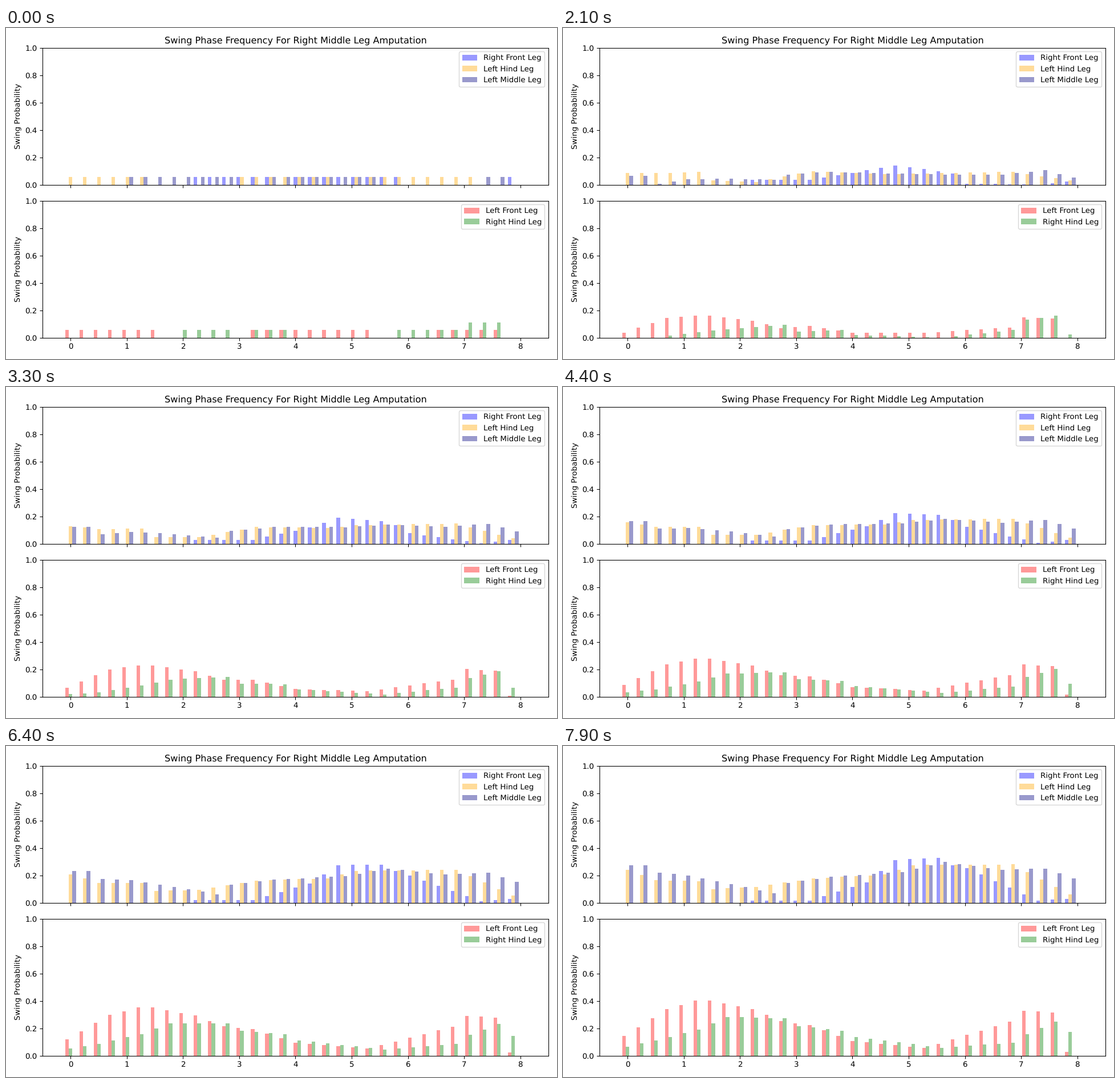
These frames come from a looping animation (966x580 px, 8000 ms). A matplotlib script:

```python
import numpy as np
import matplotlib.pyplot as plt
from matplotlib.animation import FuncAnimation

W, H, DPI = 966, 580, 96.6
FRAMES, STEP_MS = 80, 100
BIN_WIDTH = 0.254
BAR_WIDTH = BIN_WIDTH / 4
BINS = np.arange(32)
FLIES = 18
HOLD_END, MID, END = 200, 2100, 7900

plt.rcParams["text.hinting"] = "none"
fig = plt.figure(figsize=((W + 0.001) / DPI, (H + 0.001) / DPI), dpi=DPI)
legs = []


def add_panel(top, show_labels):
    left, right, height = 63.9, 951, 240
    ax = fig.add_axes([left / W, 1 - (top + height) / H,
                       (right - left) / W, height / H])
    ax.set_xlim(-0.5, 8.5)
    ax.set_ylim(0, 1)
    ax.set_xticks(range(9))
    ax.set_ylabel("Swing Probability")
    ax.tick_params(labelbottom=show_labels)
    return ax


def add_leg(ax, name, color, slot, runs, points):
    """runs: bins of the first swings; points: (bin, middle, final) corners
    of the later profiles, in thousandths."""
    start = sum(((BINS >= a) & (BINS <= b)) / FLIES for a, b in runs)
    corner, mid, final = np.array(points).T
    mid = np.interp(BINS, corner, mid) / 1000
    final = np.interp(BINS, corner, final) / 1000
    x = BINS * BIN_WIDTH + slot * BAR_WIDTH
    bars = ax.bar(x, start, BAR_WIDTH, color=color, alpha=0.4, label=name)
    legs.append((bars, start, mid, final))


upper = add_panel(34.6, False)
lower = add_panel(302.6, True)
upper.set_title("Swing Phase Frequency For Right Middle Leg Amputation")

add_leg(upper, "Right Front Leg", "blue", -1,
        [(9, 14), (16, 23), (31, 31)],
        [(8, 0, 0), (9, 35, 13), (13, 35, 13), (17, 105, 150),
         (19, 140, 312), (22, 100, 328), (23, 80, 273), (24, 8, 252),
         (29, 0, 15), (31, 25, 28)])

add_leg(upper, "Left Hind Leg", "orange", 0,
        [(0, 5), (12, 18), (20, 28)],
        [(0, 84, 240), (2, 84, 163), (5, 95, 157), (6, 30, 100),
         (9, 20, 115), (13, 100, 178), (18, 78, 205), (20, 80, 275),
         (27, 95, 280), (31, 30, 60)])

add_leg(upper, "Left Middle Leg", "navy", 1,
        [(4, 11), (14, 21), (29, 30)],
        [(1, 65, 275), (2, 8, 220), (4, 40, 200), (7, 45, 135),
         (10, 36, 70), (11, 75, 145), (14, 95, 190), (19, 80, 225),
         (22, 75, 297), (26, 75, 240), (29, 105, 250), (31, 53, 177)])

add_leg(lower, "Left Front Leg", "red", -1,
        [(0, 6), (13, 21), (26, 30)],
        [(0, 35, 143), (3, 145, 338), (5, 160, 402), (6, 160, 402),
         (9, 123, 340), (11, 70, 253), (13, 85, 222), (16, 35, 108),
         (21, 35, 55), (27, 75, 248), (28, 150, 328), (30, 140, 315),
         (31, 0, 28)])

add_leg(lower, "Right Hind Leg", "green", 0,
        [(8, 11), (13, 15), (23, 30), (28, 30)],
        [(0, 0, 67), (2, 0, 110), (5, 40, 190), (7, 62, 283),
         (11, 94, 272), (12, 45, 217), (15, 55, 183), (16, 20, 137),
         (22, 0, 58), (27, 55, 95), (28, 130, 157), (30, 160, 250),
         (31, 23, 175)])

upper.legend(loc="upper right")
lower.legend(loc="upper right")


def blend(a, b, u):
    return a + (b - a) * u


def draw(frame):
    t = frame * STEP_MS
    rise = np.clip((t - HOLD_END) / (MID - HOLD_END), 0, 1)
    settle = np.clip((t - MID) / (END - MID), 0, 1) ** 0.8
    for bars, start, mid, final in legs:
        heights = blend(blend(start, mid, rise), final, settle)
        for bar, h in zip(bars, heights):
            bar.set_height(h)
    return []


anim = FuncAnimation(fig, draw, frames=FRAMES, interval=STEP_MS,
                     repeat=True, repeat_delay=0, blit=False)
plt.show()
```
